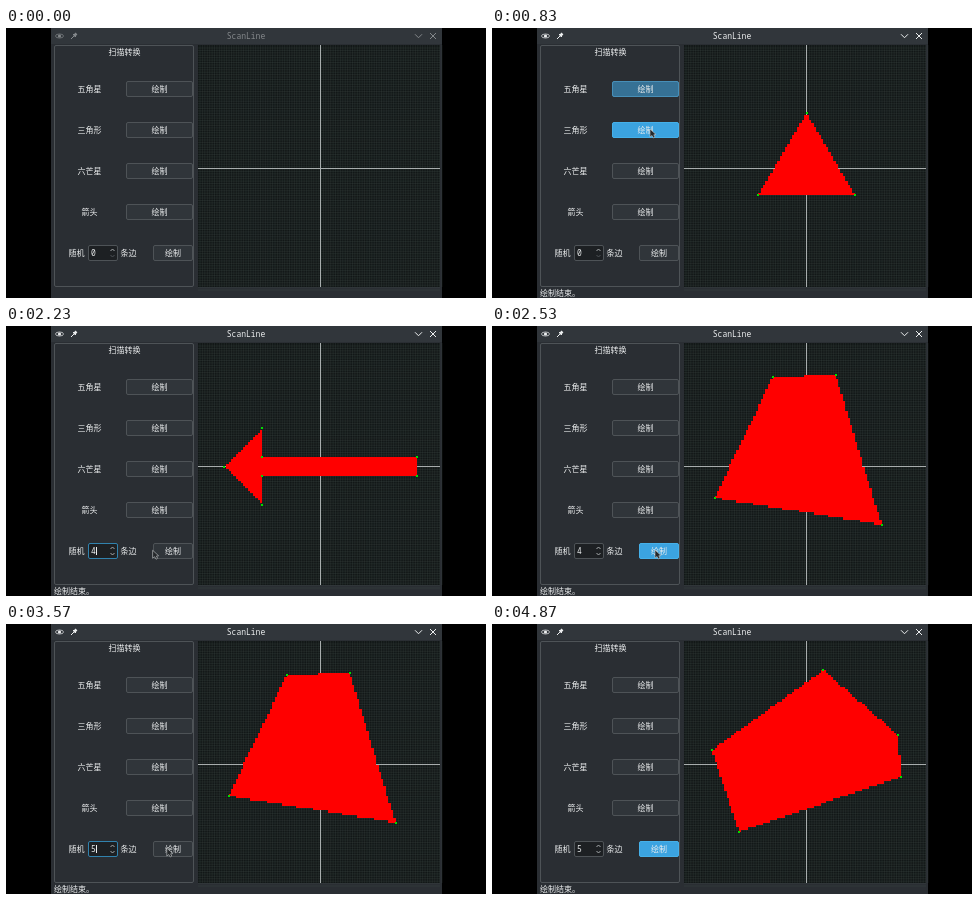
Animation of 480x270 px, one loop 5030 ms. Source, as an HTML page with a canvas:

```html
<!DOCTYPE html>
<html lang="zh">
<head>
<meta charset="utf-8">
<title>ScanLine</title>
<style>
html, body { margin: 0; height: 100%; overflow: hidden; background: #000; }
canvas { display: block; }
</style>
</head>
<body>
<canvas id="stage" width="480" height="270"></canvas>
<script>
const g = document.getElementById('stage').getContext('2d');
const LOOP = 5030, CELL = 2.42, CX = 314.5, CY = 140.5;
const TRAVEL = 240, CLEAR_DELAY = 33, HIDE = 4870;
const CJK = '8px "Noto Sans CJK SC", "Noto Sans CJK", sans-serif';
const MONO = '8px "Noto Sans Mono", monospace';
const BLUE = '#3ba3e0', TEXT = '#eceeef', BORDER = '#4e5357', BODY = '#2a2e33';
const NAMES = ['五角星', '三角形', '六芒星', '箭头'];
const RANDOM = 4, SPIN = 5;
const rowY = i => 61 + 41 * i;

// Polygons in grid cells, y pointing up
const ring = (count, ...radii) => Array.from({ length: count }, (_, i) => {
  const r = radii[i % radii.length], a = i * 2 * Math.PI / count;
  return [Math.round(r * Math.sin(a)), Math.round(r * Math.cos(a))];
});
const upper = [[-40, 0], [-24, 16], [-24, 4], [40, 4]];
const arrow = [...upper, ...upper.slice(1).reverse().map(([x, y]) => [x, -y])];
const quad = [[-14, 37], [12, 38], [31, -24], [-38, -13]];
const pentagonA = [[-26, 29], [37, 14], [39, -1], [8, -38], [-36, -16]];
const pentagonB = [[7, 39], [38, 12], [39, -5], [-28, -28], [-39, 6]];

// Each click: when, on which control, and what it draws or types
const draws = (at, place, shape, length) => ({ at, place, shape, end: at + length });
const types = (at, value) => ({ at, place: SPIN, value });
const clicks = [
  draws(270, 0, ring(10, 38.5, 14.7), 230),
  draws(710, 1, ring(3, 22.6), 110),
  draws(1080, 2, ring(12, 22.6, 13), 150),
  draws(1470, 3, arrow, 255),
  types(2080, '4'),
  draws(2385, RANDOM, quad, 145),
  types(3000, '5'),
  draws(3650, RANDOM, pentagonA, 340),
  draws(4290, RANDOM, pentagonB, 200)
];

function rect(x, y, w, h, fill) {
  g.fillStyle = fill;
  g.fillRect(x, y, w, h);
}

function box(x, y, w, h, fill, stroke) {
  g.beginPath();
  g.roundRect(x + .5, y + .5, w - 1, h - 1, 1.5);
  g.fillStyle = fill;
  g.fill();
  g.strokeStyle = stroke;
  g.lineWidth = 1;
  g.stroke();
}

function path(points, color, width = 1) {
  g.beginPath();
  points.forEach(p => g.lineTo(...p));
  g.strokeStyle = color;
  g.lineWidth = width;
  g.stroke();
}

function chevron(x, y, size, dir, color) {
  path([[x - size, y - size / 2 * dir], [x, y + size / 2 * dir], [x + size, y - size / 2 * dir]], color);
}

function label(s, x, y, align = 'center', font = CJK, color = TEXT) {
  g.font = font;
  g.fontKerning = 'none';
  g.textAlign = align;
  g.fillStyle = color;
  g.fillText(s, x, y + 3);
}

function titleBar(active) {
  const color = active ? TEXT : '#84888b', back = '#31363b';
  rect(45, 0, 391, 16, back);
  label('ScanLine', 240, 8, 'center', MONO, color);
  g.beginPath();
  g.ellipse(53.5, 8, 4, 2, 0, 0, 7);
  g.strokeStyle = color;
  g.lineWidth = .7;
  g.stroke();
  g.beginPath();
  g.arc(53.5, 8, 1.6, 0, 7);
  g.fillStyle = color;
  g.fill();
  path([[65, 11], [69, 7]], color);
  path([[67, 6], [70, 9]], color);
  path([[68, 8], [70.5, 5.5]], color, 2.5);
  chevron(412.5, 8, 3.5, 1, color);
  path([[424, 5], [430, 11]], color);
  path([[430, 5], [424, 11]], color);
}

function button(x, y, w, level) {
  box(x, y - 8, w, 16, '#30353a', BORDER);
  g.globalAlpha = level;
  box(x, y - 8, w, 16, BLUE, '#45b0e9');
  g.globalAlpha = 1;
  label('绘制', x + w / 2, y);
}

function panel(t, current, previous) {
  const focus = current?.place, y = rowY(RANDOM);
  const level = i => i === focus ? 1 : i === previous?.place && t < current.end + 40 ? .55 : 0;
  box(48, 17, 140, 242, BODY, BORDER);
  label('扫描转换', 118.5, 24);
  NAMES.forEach((name, i) => {
    label(name, 83.5, rowY(i));
    button(120, rowY(i), 67, level(i));
  });
  label('随机', 70.5, y);
  label('条边', 122.5, y);
  button(147, y, 40, level(RANDOM));
  box(82, y - 8, 30, 16, '#1d2023', focus === SPIN ? '#3182ad' : BORDER);
  const typed = clicks.findLast(c => c.value && t >= c.at + 80);
  label(typed?.value ?? '0', 85, y, 'left', MONO);
  if (focus === SPIN) rect(90, y - 4, 1, 8, TEXT);
  chevron(106.5, y - 3, 2, -1, '#a7abad');
  chevron(106.5, y + 3, 2, 1, typed ? '#a7abad' : BORDER);
}

function plane() {
  rect(192, 17, 242, 242, '#121717');
  for (let i = -50; i <= 50; i++) {
    rect(CX + i * CELL, 17, 1, 242, 'rgba(72, 84, 82, .24)');
    rect(192, CY + i * CELL, 242, 1, 'rgba(72, 84, 82, .24)');
  }
  rect(314, 17, 1, 242, '#a8adad');
  rect(192, 140, 242, 1, '#a8adad');
}

function crossings(shape, y) {
  const xs = [];
  shape.forEach(([x1, y1], i) => {
    const [x2, y2] = shape[(i + 1) % shape.length];
    if (y1 > y !== y2 > y) xs.push(x1 + (y - y1) * (x2 - x1) / (y2 - y1));
  });
  return xs.sort((a, b) => a - b).map(Math.round);
}

function polygon(shape, progress) {
  const ys = shape.map(p => p[1]), low = Math.min(...ys), high = Math.max(...ys);
  const px = x => Math.round(CX + x * CELL), py = y => Math.round(CY - y * CELL);
  for (let row = low; row < low + (high - low) * progress; row++) {
    const xs = crossings(shape, row + .5), top = py(row + 1);
    for (let i = 0; i < xs.length; i += 2)
      rect(px(xs[i]), top, px(xs[i + 1]) - px(xs[i]), py(row) - top, '#f00');
  }
  shape.forEach(([x, y]) => rect(px(x) - 1, py(y) - 1, 2, 2, '#0d0'));
}

function pointerAt(t) {
  const spot = c => !c ? [232, 128]
    : c.place === SPIN ? [101, 225]
    : c.place === RANDOM ? [163, 224] : [158, rowY(c.place) - 1];
  const next = clicks.findIndex(c => c.at > t);
  if (next < 0) return spot(clicks.at(-1));
  const from = spot(clicks[next - 1]), to = spot(clicks[next]);
  const u = Math.max(0, 1 - (clicks[next].at - t) / TRAVEL), e = 1 - (1 - u) ** 3;
  return from.map((v, i) => v + (to[i] - v) * e);
}

function pointer(t) {
  const [x, y] = pointerAt(t);
  if (x > 82 && x < 112 && y > 217 && y < 233) {
    path([[x, y - 4], [x, y + 4]], '#fff');
    for (const end of [y - 4, y + 4]) path([[x - 2, end], [x + 2, end]], '#fff');
    return;
  }
  g.beginPath();
  [[0, 0], [0, 8], [2, 6.5], [3.5, 9], [5, 8], [3.8, 5.8], [6, 5.5]]
    .forEach(([dx, dy]) => g.lineTo(x + dx, y + dy));
  g.closePath();
  g.fillStyle = '#25282b';
  g.fill();
  g.strokeStyle = '#c8cbcd';
  g.lineWidth = .6;
  g.stroke();
}

function draw(t) {
  const past = clicks.filter(c => t >= c.at);
  const [previousJob, job] = [undefined, ...past.filter(c => c.shape)].slice(-2);
  rect(0, 0, 480, 270, '#000');
  rect(45, 0, 391, 270, BODY);
  titleBar(t >= 30);
  panel(t, past.at(-1), past.at(-2));
  plane();
  if (job) {
    const begin = job.at + CLEAR_DELAY;
    if (t >= begin) polygon(job.shape, Math.min(1, (t - begin) / (job.end - begin)));
    else if (previousJob) polygon(previousJob.shape, 1);
    label(t < job.end ? '绘制中 。。。' : '绘制结束。', 48, 265, 'left');
  }
  if (t >= 30 && t < HIDE) pointer(t);
}

function tick() {
  draw(performance.now() % LOOP);
  requestAnimationFrame(tick);
}
tick();
</script>
</body>
</html>
```
